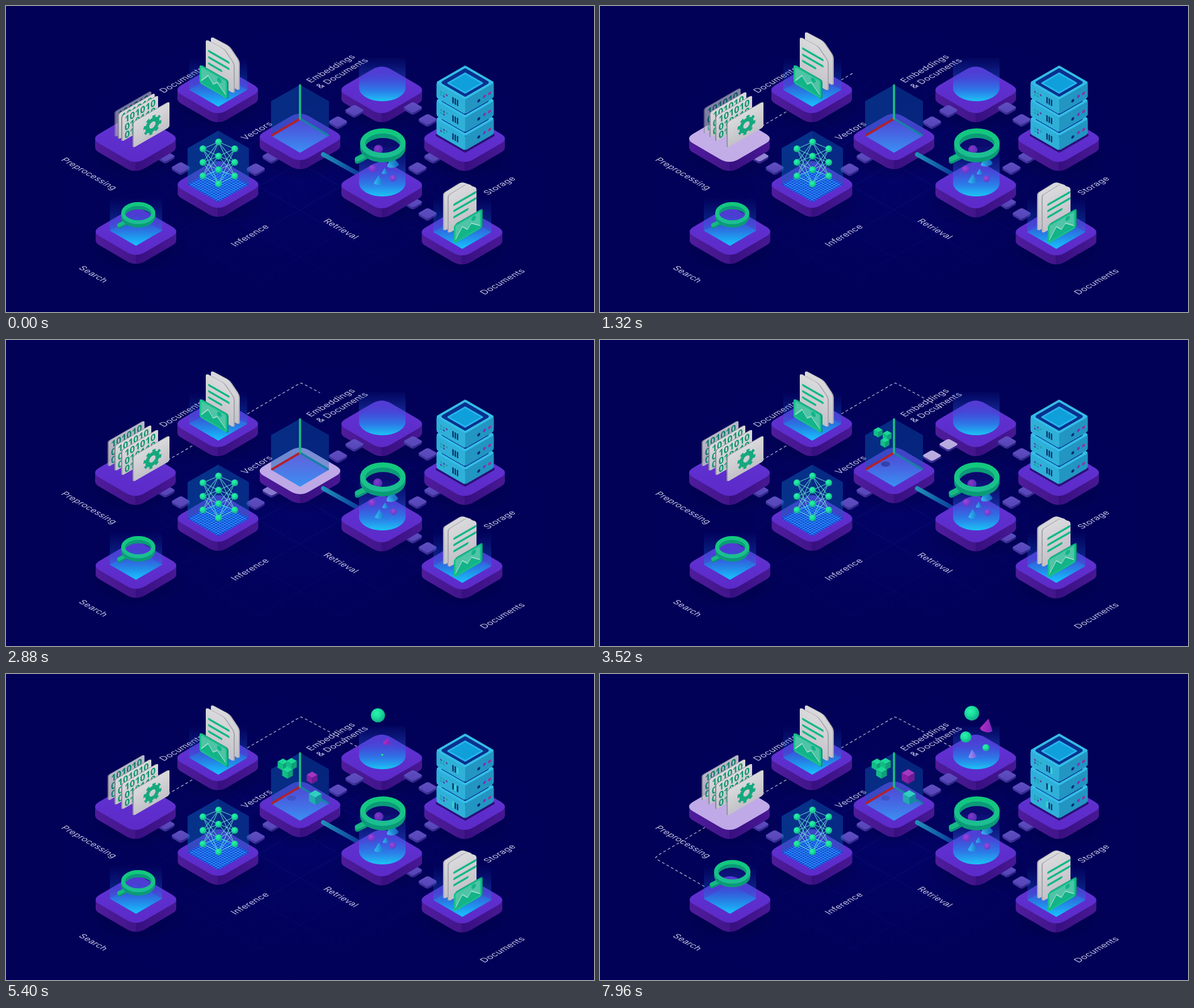
An HTML page for the animation above (8 s loop, 1036x540 px).

```html
<!DOCTYPE html>
<html lang="en">
<head>
<meta charset="utf-8">
<title>Isometric data pipeline</title>
<style>
html, body { margin: 0; width: 100%; height: 100%; overflow: hidden; background: #010158; }
svg { display: block; width: 1036px; height: 540px; }
.label { font: 400 15.3px Inter, "Open Sans", sans-serif; letter-spacing: .2px; fill: #c3c2e4; }
.bits { font: 700 16px "Open Sans", "Noto Sans", sans-serif; fill: #11936f; }
</style>
</head>
<body>
<svg id="stage" viewBox="0 0 1036 540" xmlns="http://www.w3.org/2000/svg"></svg>
<script>
const SLOPE = 0.577;
const LOOP = 8000;

// ---- drawing helpers ----
const at = (x, y, body, s = 1) => `<g transform="translate(${x} ${y}) scale(${s})">${body}</g>`;
const down = (x, y, body) => `<g transform="matrix(1 ${SLOPE} 0 1 ${x} ${y})">${body}</g>`;
const up = (x, y, body) => `<g transform="matrix(1 ${-SLOPE} 0 1 ${x} ${y})">${body}</g>`;
const poly = (pts, fill, extra = '') => `<polygon points="${pts}" fill="${fill}" ${extra}/>`;
const rect = (x, y, w, h, r, fill, extra = '') =>
  `<rect x="${x}" y="${y}" width="${w}" height="${h}" rx="${r}" fill="${fill}" ${extra}/>`;
const ball = (x, y, r, fill, extra = '') => `<circle cx="${x}" cy="${y}" r="${r}" fill="${fill}" ${extra}/>`;
const line = (x1, y1, x2, y2, color, w, extra = '') =>
  `<path d="M${x1} ${y1}L${x2} ${y2}" stroke="${color}" stroke-width="${w}" stroke-linecap="round" fill="none" ${extra}/>`;
const diamond = (x, y, w, h) => `${x - w},${y} ${x},${y - h} ${x + w},${y} ${x},${y + h}`;
const softDiamond = (x, y, w, fill, edge, r) =>
  poly(diamond(x, y, w, w * SLOPE), fill, `stroke="${edge}" stroke-width="${r}" stroke-linejoin="round"`);

const gradient = (id, stops, dir = 'x2="0" y2="1"') =>
  `<linearGradient id="${id}" ${dir}>` +
  stops.map(([o, c, a = 1]) => `<stop offset="${o}" stop-color="${c}" stop-opacity="${a}"/>`).join('') +
  '</linearGradient>';
const shine = (id, light, mid, dark) =>
  `<radialGradient id="${id}" cx=".4" cy=".35" r=".7"><stop stop-color="${light}"/>` +
  `<stop offset=".45" stop-color="${mid}"/><stop offset="1" stop-color="${dark}"/></radialGradient>`;

const TOP = 'M-63-9.1L-16-36.5Q0-45.6 16-36.5L63-9.1Q79 0 63 9.1L16 36.5Q0 45.6-16 36.5L-63 9.1Q-79 0-63-9.1Z';
const SIDE = 'M-71 0V16Q-71 20.6-63 25L-16 52.5Q0 61.6 16 52.5L63 25Q71 20.6 71 16V0Z';

function slab(id, x, y, s = 1, kind = 'base') {
  return at(x, y, `<path d="${SIDE}" fill="url(#${kind}Side)"/><path d="${TOP}" fill="url(#${kind}Top)"/>` +
    `<path id="${id}" d="${TOP}" fill="#e2d6f0" opacity="0"/>`, s);
}

function beam(x, y, w, top) {
  const h = w * SLOPE;
  return poly(diamond(x, y, w, h), 'url(#floor)') +
    poly(`${x - w},${top} ${x + w},${top} ${x + w},${y} ${x},${y + h} ${x - w},${y}`, 'url(#beam)');
}

function tube(x, y, top) {
  return `<ellipse cx="${x}" cy="${y}" rx="41" ry="24" fill="url(#floor)" opacity=".5"/>` +
    `<path d="M${x - 41} ${top}H${x + 41}V${y}A41 24 0 0 1 ${x - 41} ${y}Z" fill="url(#tube)"/>`;
}

function page(flip) {
  const cut = 'M0 5Q0 1 4 1L27 0Q32 0 35 3L46 13Q49 16 49 20V64Q49 68 45 68H4Q0 68 0 64Z';
  const e = flip ? -2 : 2;
  return `<path d="${cut}" transform="translate(${e} -1)" fill="#a5a4b0"/><path d="${cut}" fill="url(#paper)"/>`;
}
const textLines = (x, y, w) => [0, 1, 2].map(i =>
  line(x, y + i * 11, x + (i == 2 ? w * .62 : w), y + i * 11, '#12b886', 4)).join('');
function picture() {
  return rect(2, -1, 49, 34, 4, '#0b8f75') + rect(0, 0, 49, 33, 4, '#16c08b') +
    rect(3, 3, 43, 27, 2, '#4fc4a6') +
    '<path d="M3 28L15 11L24 21L31 14L46 28V30H3Z" fill="#12b488"/>' +
    '<path d="M3 27L15 11L24 21L31 14L46 27" fill="none" stroke="#a4dccd" stroke-width="1.4"/>' +
    ball(35, 8, 4, '#12b488');
}

function card(id) {
  const rows = ['101010', '010110', '011010'].map((s, i) => `<text class="bits" x="4" y="${15 + i * 14}">${s}</text>`);
  return `<g id="${id}">` + up(0, 0, rect(-2, -1, 63, 45, 3, '#8a8998') + rect(0, 0, 63, 45, 3, 'url(#paper)') +
    `<g>${rows.join('')}</g>`) + '</g>';
}
function gear() {
  const ring = (r, w, extra = '') => `<circle cx="33" cy="24" r="${r}" fill="none" stroke="#16a87e" stroke-width="${w}" ${extra}/>`;
  return ring(9, 7) + ring(13.5, 5, 'pathLength="16" stroke-dasharray="1 1"');
}

function magnifier() {
  const ring = (dy, c) => `<ellipse cy="${dy}" rx="35.5" ry="21.5" fill="none" stroke="${c}" stroke-width="9"/>`;
  return '<ellipse rx="34" ry="21" cy="4" fill="#3c3fc8" opacity=".15"/>' +
    line(-31, 25, -45, 32, '#0a9477', 9) + line(-31, 21, -45, 28, '#17b985', 9) +
    [8, 6, 4, 2].map(d => ring(d, '#0b9b78')).join('') + ring(0, 'url(#ring)');
}

const cube = (a, b, c) => poly('0,-10 8.7,-5 0,0 -8.7,-5', a) + poly('-8.7,-5 0,0 0,10 -8.7,5', b) + poly('8.7,-5 0,0 0,10 8.7,5', c);
const cone = fill => `<path d="M0-12L11 7A11 5 0 0 1-11 7Z" fill="${fill}"/>`;
const item = (id, body) => `<g id="${id}">${body}</g>`;
const greenCube = ['#1ad895', '#13bd86', '#0ea078'];

function label(x, y, text, dir) {
  const m = dir > 0 ? '.866 .5 -.866 .5' : '.866 -.5 .866 .5';
  return `<text class="label" transform="matrix(${m} ${x} ${y})">${text}</text>`;
}

function server(i) {
  const y = 135 + i * 32, h = 27;
  const dot = (u, v, c) => ball(u, v, 2.6, c);
  const left = rect(0, 0, 50.5, h, 3, '#2fb0d8') +
    [0, 1, 2, 3, 4].map(k => `<circle id="led${i}${k}" cx="${8 + k % 3 * 5}" cy="${k < 3 ? 12 : 17}" r="1.7" fill="#18d6a0"/>`).join('') +
    [0, 1, 2].map(k => `<rect id="slot${i}${k}" x="${28 + k * 4}" y="9" width="2.2" height="11" fill="#07255f"/>`).join('');
  const right = rect(0, 0, 50.5, h, 3, '#2295c2') + dot(24, 17, '#0a2c78') + dot(34, 15, '#7a33b8') + dot(43, 15, '#a02c9e');
  return down(758.5, y, left) + up(809, y + 29, right) +
    softDiamond(809, y, 48, '#35bde6', '#35bde6', 4) + softDiamond(809, y, 39, '#08308f', '#08308f', 5) +
    softDiamond(809, y + 1, 30, '#0fa0dc', '#28b4ea', 3);
}

function network() {
  const cols = [[347, [252, 276, 300]], [374.5, [240, 265, 289, 314]], [403, [252, 276, 300]]];
  let out = '', dots = '';
  cols.forEach(([x, ys], c) => ys.forEach((y, i) => {
    if (c < 2) cols[c + 1][1].forEach(y2 => out += line(x, y, cols[c + 1][0], y2, '#6fe0d8', 1.1, 'opacity=".85"'));
    dots += ball(x, y, 6, 'url(#green)') + (c == 1 ? `<circle id="node${i}" cx="${x}" cy="${y}" r="6" opacity="0" fill="${['#06233f', '#0c4a5c', '#dcdcf2', '#06233f'][i]}"/>` : '');
  }));
  return out + dots;
}

function mesh() {
  let out = '';
  for (let i = 1; i < 14; i++) {
    const a = i / 14 * 54, b = i / 14 * 31;
    out += line(320 + a, 315 - b, 374 + a, 346 - b, '#36c3ff', .7) + line(320 + a, 315 + b, 374 + a, 284 + b, '#36c3ff', .7);
  }
  return out;
}

function floorGrid() {
  let out = '';
  for (let k = -4; k < 5; k++) for (const d of [-1, 1])
    out += line(117, 360 + k * 83 - d * 400 * SLOPE, 917, 360 + k * 83 + d * 400 * SLOPE, '#2337c0', .8);
  return `<g mask="url(#fade)" opacity=".3">${out}</g>`;
}

// ---- layout ----
const bases = { pre: [228, 234], docs: [373, 148], infer: [373.5, 315], vec: [518, 231], emb: [662, 148],
  find: [662, 316], store: [808, 234], result: [803.5, 399], search: [229, 398] };
const base = id => slab(id, ...bases[id]);
const stones = [[281, 265], [308, 285], [440, 287], [468, 265], [585, 204], [614, 184],
  [717, 179], [743, 200], [753, 265], [725, 285], [717, 346], [743, 366]];

const defs = gradient('baseTop', [[0, '#6134d4'], [1, '#5c2ac8']]) +
  gradient('baseSide', [[0, '#4f1c9c'], [.5, '#42158a'], [.5, '#370f80'], [1, '#481894']], '') +
  gradient('stoneTop', [[0, '#5f4fc2'], [1, '#5444b6']]) +
  gradient('stoneSide', [[0, '#40329b'], [.5, '#40329b'], [.5, '#32268b'], [1, '#32268b']], '') +
  gradient('floor', [[0, '#3a50dd', .25], [1, '#14bdf8']]) +
  gradient('beam', [[0, '#1c50d0', 0], [.5, '#1a62d8', .35], [1, '#1ac4ff', .85]]) +
  gradient('tube', [[0, '#1c50d0', .05], [.45, '#2f58dc', .42], [.75, '#2585ec', .8], [1, '#1cc5f5']]) +
  gradient('paper', [[0, '#dadadc'], [1, '#c2c1c8']]) +
  gradient('ring', [[0, '#12c87d'], [1, '#1cbe92']]) +
  gradient('plane', [[0, '#4a50d8', .8], [1, '#3a92f4']]) +
  gradient('bar', [[0, '#1f8fb8'], [1, '#0b3c9c']], '') +
  gradient('pinkCone', [[0, '#b82cc4'], [1, '#7426b8']], '') +
  gradient('paleCone', [[0, '#a596ee'], [1, '#6f62e4']], '') +
  gradient('blueCone', [[0, '#35d0f2'], [1, '#1678d0']], '') +
  shine('green', '#2cf2b0', '#1bdf9c', '#0fa588') + shine('pink', '#b648dc', '#8f3ad2', '#5b3abf') +
  '<radialGradient id="spot"><stop stop-color="#fff"/><stop offset="1" stop-color="#000"/></radialGradient>' +
  '<radialGradient id="glow"><stop stop-color="#0808a0" stop-opacity=".22"/><stop offset="1" stop-color="#010158" stop-opacity="0"/></radialGradient>' +
  '<radialGradient id="shade"><stop offset=".5" stop-color="#00003c" stop-opacity=".3"/><stop offset="1" stop-color="#00003c" stop-opacity="0"/></radialGradient>' +
  '<mask id="fade"><ellipse cx="518" cy="310" rx="420" ry="260" fill="url(#spot)"/></mask>';

const trail = id => `<path id="${id}" fill="none" stroke="#b9b8d8" stroke-width="1.2" stroke-dasharray="5 4"/>`;

const scene = [
  `<defs>${defs}</defs>`,
  '<rect width="1036" height="540" fill="#010158"/>',
  '<ellipse cx="518" cy="310" rx="460" ry="290" fill="url(#glow)"/>',
  floorGrid(),
  ...Object.values(bases).map(([x, y]) => `<ellipse cx="${x}" cy="${y + 28}" rx="92" ry="50" fill="url(#shade)"/>`),
  trail('intake'), trail('query'),
  label(278, 154, 'Documents', -1), label(422, 237, 'Vectors', -1), label(404, 425, 'Inference', -1),
  label(849, 334, 'Storage', -1), label(843, 510, 'Documents', -1),
  label(537, 136, 'Embeddings', -1), label(554, 146, '&amp; Documents', -1),
  label(96, 272, 'Preprocessing', 1), label(127, 463, 'Search', 1), label(558, 380, 'Retrieval', 1),

  base('docs'), beam(374, 148, 51, 92),
  item('pageBack', down(361, 53, page())),
  item('pageFront', down(352, 58, page() + textLines(6, 18.5, 34))),
  down(341, 103, picture()),

  base('emb'), tube(663, 144, 92),
  item('cone2', cone('url(#paleCone)')), item('ball3', ball(0, 0, 10, 'url(#green)')),
  item('ball2', ball(0, 0, 10, 'url(#green)')), item('cone1', cone('url(#pinkCone)')),
  item('ball1', ball(0, 0, 10, 'url(#green)')),

  ...stones.map(([x, y], i) => slab('stone' + i, x, y, .222, 'stone')),

  base('pre'),
  card('card2'), card('card1'), card('card0'),
  up(225, 205, rect(-2, -1, 63, 45, 3, '#93929f') + rect(0, 0, 63, 45, 3, 'url(#paper)') + gear()),

  base('store'), softDiamond(809, 228, 50, '#2b0f78', '#2b0f78', 4), server(2), server(1), server(0),

  base('vec'),
  poly('467,229 467,168 518,139 518,199', '#0d5fb4', 'opacity=".45"'),
  poly('569,229 569,168 518,139 518,199', '#0d5fb4', 'opacity=".38"'),
  poly(diamond(518, 229, 51, 30), 'url(#plane)'),
  '<ellipse id="shadow" cx="503" cy="219" rx="8" ry="4.5" fill="#2a3590" opacity="0"/>',
  line(518, 199, 567, 228, '#1a7fa8', 4), line(518, 199, 469, 228, '#b3202c', 4), line(518, 140, 518, 199, '#1cb583', 4),
  ...['g0', 'g1', 'g2'].map(id => item(id, cube(...greenCube))),
  item('magenta', cube('#a436c2', '#8a1fa6', '#6f1a96')), item('teal', cube('#30cfc0', '#22abb0', '#168aa0')),
  line(559, 262, 622, 297, 'url(#bar)', 8),

  base('infer'),
  poly('320,315 320,251 374,220 374,284', '#0d62b8', 'opacity=".5"'),
  poly('428,315 428,251 374,220 374,284', '#0d62b8', 'opacity=".42"'),
  poly(diamond(374, 315, 54, 31), '#1546d8'), mesh(), network(),

  base('find'), tube(663, 312, 248),
  '<g opacity=".8">',
  item('r0', ball(0, 0, 8, 'url(#pink)')), item('r1', cone('url(#blueCone)')),
  item('r2', ball(0, 0, 7, 'url(#pink)')), item('r3', ball(0, 0, 6, 'url(#pink)')),
  item('r4', cone('url(#blueCone)')), item('r5', cone('url(#blueCone)')),
  '</g>',
  at(664, 242, magnifier()),

  base('search'), beam(229, 396.5, 46, 338), item('lens', magnifier()),

  base('result'), beam(804, 399, 51, 338),
  up(772, 329, page(true)), up(780, 333, page(true) + textLines(10, 23, 37)),
  up(789, 387, picture())
];
document.getElementById('stage').innerHTML = scene.join('');

// ---- motion ----
const el = {};
document.querySelectorAll('#stage [id]').forEach(n => el[n.id] = n);
const clamp = v => Math.max(0, Math.min(1, v));
const ease = v => (v = clamp(v), v * v * (3 - 2 * v));
const mix = (a, b, k) => a + (b - a) * k;
const set = (id, k, v) => el[id].setAttribute(k, v);
const pulse = (t, c, w) => ease(1.25 * (1 - Math.abs(t - c) / w));

function keys(t, list) {
  for (let i = 1; i < list.length; i++) {
    const [a, va] = list[i - 1], [b, vb] = list[i];
    if (t < b) return mix(va, vb, clamp((t - a) / (b - a)));
  }
  return list[list.length - 1][1];
}
function place(id, x, y, s = 1, turn = 0) {
  set(id, 'transform', `translate(${x} ${y}) rotate(${turn}) scale(${s})`);
}
// Draws a polyline up to a horizontal travel distance.
function draw(id, pts, run) {
  let d = run > 0 ? 'M' + pts[0] : '';
  for (let i = 1; i < pts.length && run > 0; i++) {
    const [ax, ay] = pts[i - 1], [bx, by] = pts[i];
    const len = Math.abs(bx - ax), k = Math.min(1, run / len);
    d += `L${mix(ax, bx, k)} ${mix(ay, by, k)}`;
    run -= len;
  }
  set(id, 'd', d);
}
function emerge(id, t, start, span, from, to, turn) {
  const k = ease((t - start) / span);
  place(id, mix(from[0], to[0], k), mix(from[1], to[1], k), t < start ? 0 : mix(from[2], to[2], k), turn);
}

const flashes = [['pre', 1150, 400], ['pre', 8160, 450], ['stone0', 1500, 330], ['stone1', 1760, 320], ['infer', 2250, 400],
  ['stone2', 2450, 300], ['stone3', 2700, 300], ['vec', 3050, 380], ['stone4', 3460, 300], ['stone5', 3590, 300],
  ['emb', 3920, 360], ['stone6', 4180, 320], ['stone7', 4420, 300], ['store', 4680, 400]];
const intakePath = [[285, 212], [515, 78], [520, 76], [525, 78], [622, 130]];
const queryPath = [[184, 375], [102, 328], [98, 324], [102, 320], [186, 270]];
const floats = [[656, 253, 1], [680, 273, .95], [645, 288, 1], [682, 304, 1], [657, 306, .72], [668, 292, .45]];

function frame(t) {
  const glow = {};
  flashes.forEach(([id, c, w]) => glow[id] = Math.max(glow[id] || 0, pulse(t, c, w)));
  for (const id in glow) set(id, 'opacity', glow[id] * (id.startsWith('stone') ? .7 : .95));
  for (let i = 0; i < 4; i++) set('node' + i, 'opacity', glow.infer);

  const hop = t < 860 ? 19 * ease(t / 860) : 19 * (1 - clamp((t - 860) / 1480)) ** 2;
  place('pageBack', 0, -hop);
  place('pageFront', 0, -hop / 2);

  const gap = 6 + 6 * ease(t / 2100);
  for (let i = 0; i < 3; i++) place('card' + i, 205 - gap * i, 194 - gap * i * .65);
  set('card2', 'opacity', mix(.55, .85, ease((t - 1100) / 900)));

  draw('intake', intakePath, keys(t, [[0, 285], [1320, 445], [2320, 507], [3520, 606], [3800, 625]]) - 285);
  draw('query', queryPath, (t - 6720) * .162);

  const join = ease((t - 3500) / 600), grow = ease((t - 3050) / 350);
  place('g0', mix(490, 488, join), mix(163, 160, join), grow * mix(.9, 1.08, join));
  place('g1', mix(506, 503, join), mix(169, 159, join), grow * mix(.9, 1.08, join));
  place('g2', mix(502, 496, join), mix(181, 174, join), grow * mix(.9, 1.08, join));
  set('shadow', 'opacity', mix(grow * .7, .3, join));
  emerge('teal', t, 4150, 650, [527, 207, .2], [545, 218, 1.3]);
  emerge('magenta', t, 4900, 700, [524, 192, .2], [543, 181, 1.3]);

  const sway = Math.sin(t / 700);
  emerge('ball1', t, 4200, 1400, [661, 125, .25], [655, 69.5 + sway * .4, 1.3]);
  emerge('cone1', t, 4800, 1300, [663, 140, .2], [682, 91 + sway * .4, 1.02], 12);
  emerge('ball2', t, 5350, 1350, [663, 143, .2], [644.5, 111.5 + sway * .4, 1]);
  emerge('ball3', t, 5950, 1300, [672, 142, .2], [680, 130, .62]);
  emerge('cone2', t, 6250, 1300, [661, 147, .25], [656, 141, .65], -6);

  floats.forEach(([x, y, s], i) => place('r' + i, x + Math.sin(t / 640 + i), y + 1.3 * Math.sin(t / 500 + i * 2), s, i == 1 ? -10 : 0));
  place('lens', 233, keys(t, [[6200, 365.5], [6600, 363.5], [7960, 349]]), keys(t, [[6500, .75], [7960, .8]]));

  const beat = Math.floor(t / 280);
  for (let i = 0; i < 3; i++) {
    for (let k = 0; k < 5; k++) set(`led${i}${k}`, 'fill', (beat + k * 2 + i) % 5 < 3 ? '#1f9fa6' : '#5d3fa8');
    for (let k = 0; k < 3; k++) set(`slot${i}${k}`, 'fill', t > 4800 && (beat + k + i) % 3 == 0 ? '#3de0c0' : '#07255f');
  }
}

function tick() {
  frame(performance.now() % LOOP);
  requestAnimationFrame(tick);
}
tick();
</script>
</body>
</html>
```
